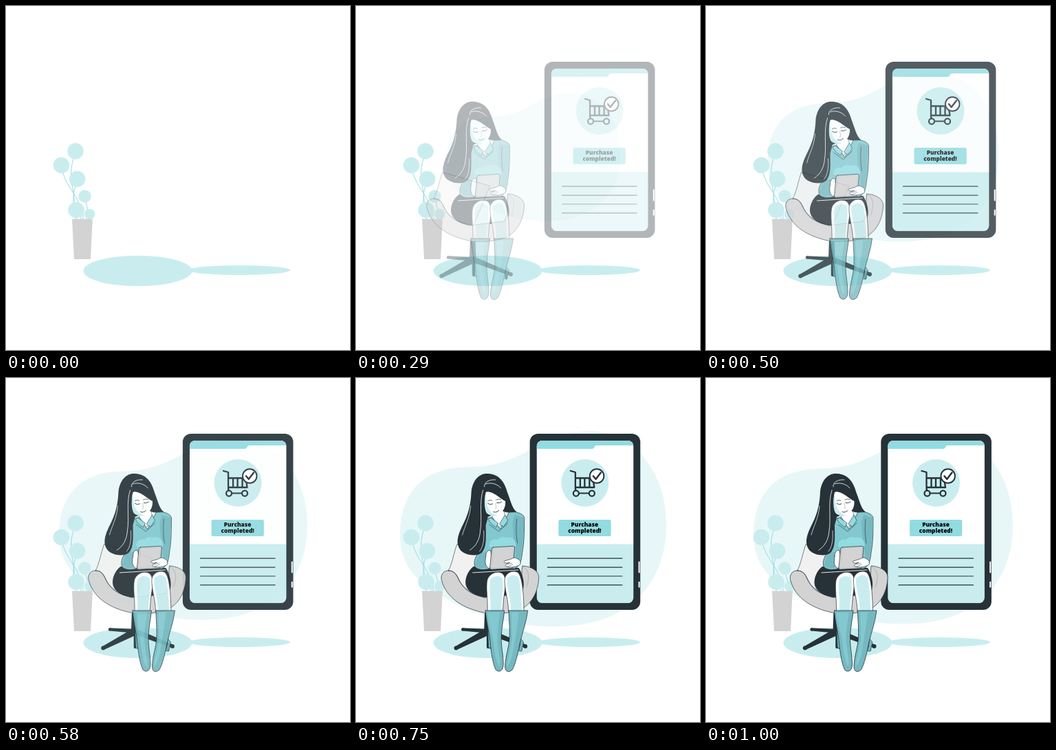
Recreate the animation shown at these times as an HTML page with a canvas. Size 500 by 500 pixels, loop 1.04 s.

```html
<!DOCTYPE html>
<html lang="en">
<head>
<meta charset="utf-8">
<title>Purchase completed</title>
<style>
html, body { margin: 0; width: 100%; height: 100%; overflow: hidden; background: #fff; }
canvas { display: block; width: 500px; height: 500px; }
</style>
</head>
<body>
<canvas id="stage" width="500" height="500"></canvas>
<script>
const SIZE = 500, LOOP = 1040, STEP = 1000 / 24;
const DARK = '#263238', PALE = '#c9edef', TEAL = '#92dbe1', MID = '#83c8cf',
      DEEP = '#75b8c0', GREY = '#d3d3d3', LIGHT = '#f1f1f1', WHITE = '#fff';

const stage = document.getElementById('stage').getContext('2d');
const layer = document.createElement('canvas');
layer.width = layer.height = SIZE;
const c = layer.getContext('2d');
c.lineCap = c.lineJoin = 'round';

function paint(path, fill, stroke, width = 0.8) {
  if (fill) { c.fillStyle = fill; c.fill(path); }
  if (stroke) { c.strokeStyle = stroke; c.lineWidth = width; c.stroke(path); }
}

const shape = (d, fill, stroke, width) => paint(new Path2D(d), fill, stroke, width);
const line = (d, stroke, width) => shape(d, null, stroke, width);

function ellipse(x, y, rx, ry, fill, stroke, width) {
  const p = new Path2D();
  p.ellipse(x, y, rx, ry, 0, 0, Math.PI * 2);
  paint(p, fill, stroke, width);
}

const circle = (x, y, r, fill, stroke, width) => ellipse(x, y, r, r, fill, stroke, width);

function box(x, y, w, h, r, fill) {
  const p = new Path2D();
  p.roundRect(x, y, w, h, r);
  paint(p, fill);
}

function floor() {
  ellipse(191.5, 385, 79, 22.2, PALE);
  ellipse(339, 384, 74, 7, PALE);
}

function plant() {
  line('M98 222C92 240 95 258 98 270Q100 285 99 305M83 243C88 262 103 275 107 290Q110 300 109 310' +
       'M101 262Q96 275 99 292M116 285L119 297M102 306V310M112 310V302', TEAL, 1);
  const blooms = [[101, 211, 11.8], [80.5, 231.5, 11.8], [103.5, 251.5, 11.8],
                  [114.5, 276.5, 9.3], [102, 296.5, 11.8], [121.5, 302.5, 7.8]];
  for (const [x, y, r] of blooms) circle(x, y, r, PALE);
  shape('M96 309.5H125.8L123 368H99Z', GREY);
}

function blob() {
  shape('M69.500 236C67 178 92 135 160 132C195 131 215 128 250 109C285 88 310 82 336 81' +
        'C400 80 446 140 446 212C446 300 390 357 290 357.5C220 358 160 337 115 306C88 288 72 268 69.500 236Z', '#e7f7f8');
}

function chair() {
  shape('M185.500 338H193L194 367H184.500Z', DARK);
  shape('M153 363.300L190 365L192 371L153 367.500Z', DARK);
  shape('M184 366L193 373L146 394.500L142 390.500Z', DARK);
  shape('M193 365L185 371L243 392L246.500 388Z', DARK);
  line('M190.500 370V391', DARK, 4.500);
  line('M238 387V395.500', DARK, 3.500);
  circle(153.5, 365.4, 2.2, DARK);
  circle(143.8, 392.4, 3, DARK);
  circle(244.5, 390, 3, DARK);
  // back, then seat shell
  shape('M145 242C140 256 138 271 132.500 280L158 314L190 320L214 262Z', LIGHT, DARK, 0.6);
  shape('M133 280C127 279 121 285 122.500 293C128 315 146 330 172 338C193 345 218 343 236 337' +
        'C254 329 263 311 264 291C265 281 254 274 240 273C238 290 242 300 235 313L185 319' +
        'C160 313 153 304 147 291C144 284 140 280 133 280Z', GREY, DARK, 0.7);
  line('M133 280C141 280 144 286 147 292C153 306 169 315 187 319', DARK, 0.6);
  line('M240 274C249 277 252 288 246 304', '#888f92', 0.5);
}

function legs() {
  shape('M169 274C160 281 156 293 158 301C162 314 178 319 194 319L237 314C245 307 243 289 235 276Z', DARK);
  shape('M189.500 340C190 320 187 306 189 294C192 283 206 279 212 285C218 291 215 306 213 321L211.500 340Z', WHITE, DARK, 0.7);
  shape('M220 340C220 322 213.500 306 214.500 292C216 283 227 278 234 283C241 291 242 318 242.500 340Z', WHITE, DARK, 0.7);
  shape('M193.500 340C195 320 191 304 193.500 293C198 286 209 287 211.500 292C213 305 210 323 209 340Z', PALE);
  shape('M223.500 340C224 320 217 305 218 291C224 285 232 285 235 291C238 306 239 324 239.500 340Z', PALE);
  line('M168 283Q200 281 234 279', WHITE, 0.9);
}

function boots() {
  shape('M190 365L191 391L193.500 394L196 382Z', DEEP, DARK, 0.6);
  shape('M238 379L242 384L239 397L235.500 397Z', DEEP, DARK, 0.6);
  shape('M186.500 338H214C213 350 210 362 209.500 375C209 392 213 405 212.500 417C212 427 205 428 201.500 424' +
        'C196 412 194.500 394 192.500 376C189.500 360 187.500 350 186.500 338Z', DEEP, DARK, 0.8);
  shape('M220.500 338H248C246 355 240 370 237 384C233.500 400 230.500 415 225.500 424C221 428 215.500 428 215 420' +
        'C215 405 221 392 221.500 376C222 360 220.500 350 220.500 338Z', DEEP, DARK, 0.8);
  shape('M189.500 340.500H208C205 358 203 370 204 385C206 402 209 412 207 420C201 412 199.500 393 196.500 375C192 360 190.500 352 189.500 340.500Z', MID);
  shape('M224 340.500H235C233 361 229 383 226 402C222 414 220 418 218 419C218 407 224 392 225 376Z', MID);
}

function sweater() {
  shape('M198 193L213 191L216 206L205 219L196 206Z', WHITE, DARK, 0.5);
  shape('M190 204C183 215 183 231 178 252C172 259 169 266 171 274C177 281 189 278 193 277L229 277' +
        'C237 274 239 264 240 254C243 239 243 221 243 203C241 196 231 195 222 193L208 220L197 203Z', MID, DARK, 0.7);
  shape('M226 210C226 230 231 244 231 260L235 269C239 263 240 247 242 227L242.500 203L229 199Z', DEEP);
  shape('M192 244C191 237 198 233 204 235C207 230 214 231 218 232C226 229 233 239 230 246L194 246Z', TEAL);
  shape('M177 254L171 272Q181 280 189 274L188 253Z', DEEP);
  shape('M194 203L205 211L202 217Q193 211 191 206Z', TEAL, DARK, 0.6);
  shape('M207 212L215 199L219 207L213 216Z', TEAL, DARK, 0.6);
  line('M192 213L206 223L219 211M232 205Q230 224 233 240', DARK, 0.6);
}

function pad() {
  shape('M187 259C187 252 191 249 194 251L197 268L192 277C185 273 186 267 187 259Z', WHITE, DARK, 0.7);
  shape('M198 246L226.500 244.300Q229.300 244.300 229 247L226.500 274Q226 276.500 224 276.800L195 278.300Q192.500 278 193 275L195.500 249Q196 246 198 246Z',
        '#c8cbcc', DARK, 0.7);
  shape('M199 248L226.500 246.500L224 274L195.500 275.500Z', GREY);
  shape('M237 266C233 261 228 260 224 263L214 266C212 269 218 270 222 268C215 271 214 273 217 274C223 276 232 275 237 271Z',
        WHITE, DARK, 0.7);
  line('M218 271L225 269M219 274L226 271', DARK, 0.5);
}

function head() {
  shape('M190 139C177 138 168 149 166 165C165 190 159 203 151 219C146 230 143 241 150 250' +
        'C157 258 174 260 181 254C189 246 187 229 187 214L190 202L211 193C218 197 225 195 232 195' +
        'C225 189 223 178 219 168C215 154 209 140 190 139Z', DARK);
  shape('M187 166C185.500 174 185 181 187 190C189 199 200 202 205 199C213 194 216 187 215.500 179' +
        'C211 177 207 173 202 170C197 167 191 164 187 166Z', WHITE);
  shape('M186.500 168C184.500 180 185 190 188 196C193 201 201 201 204 200C194 197 188 188 188 178Z', PALE);
  line('M190 182.500Q193.500 185 197 183M203 181.500Q207 182.500 210 180', DARK, 0.9);
  line('M190 178.500Q193 176.500 196 178M202 177Q206 175 209 176.500', DARK, 0.7);
  line('M201 182L202.500 189L200.500 189.500', '#849397', 0.5);
  line('M198 194.500Q202 196.500 206 192.500', DARK, 0.9);
  line('M185 158C184 151 193 147 201 148M187 154C194 151 204 154 209 160', WHITE, 0.8);
  line('M183 163C177 180 182 204 179 222C178 236 172 245 164 250', WHITE, 0.8);
  line('M184 222C185 236 183 246 178 252M165 186C164 203 156 216 153 228', WHITE, 0.7);
}

function woman() {
  legs();
  boots();
  sweater();
  pad();
  head();
}

function cart() {
  circle(334.5, 152.5, 34.5, PALE);
  line('M313.500 135L320.500 137V162M321 145.500H346L348 159H321M327.500 146V159M334 146V159M341 146V159', DARK, 2.3);
  line('M321 162V167.500H344', DARK, 2.2);
  circle(321.5, 167.7, 4, PALE, DARK, 2.3);
  circle(344.5, 167.7, 4, PALE, DARK, 2.3);
  circle(351.7, 142.5, 10.3, WHITE, DARK, 1.9);
  line('M346.500 142.500L350.200 147L357.500 137.500', DARK, 2.5);
}

function phone() {
  box(254.3, 81, 160.6, 256, 12, DARK);
  c.save();
  c.beginPath();
  c.roundRect(264.3, 91, 140.6, 236.3, 8);
  c.clip();
  c.fillStyle = WHITE;
  c.fillRect(264, 91, 142, 151);
  c.fillStyle = PALE;
  c.fillRect(264, 241.5, 142, 86);
  shape('M264 91H406V98H351Q349 98 348 100.500Q347 103 344 103H264Z', TEAL);
  c.restore();
  box(412.2, 266.5, 2, 17, 1, WHITE);
  box(412.2, 295.7, 2, 9, 1, WHITE);
  cart();
  box(296, 206, 76.3, 24, 2.5, TEAL);
  c.fillStyle = '#000';
  c.font = '800 8.4px "Open Sans", Lato, sans-serif';
  c.textAlign = 'center';
  c.fillText('Purchase', 334, 216.1);
  c.fillText('completed!', 334, 224.9);
  for (const y of [262.2, 275.1, 288, 300.9]) line(`M280 ${y}H388.5`, DARK, 1.2);
}

// cubic-bezier(.36, -.01, .5, 1.38)
function ease(x) {
  if (x >= 1) return 1;
  const curve = (u, a, b) => 3 * (1 - u) * (1 - u) * u * a + 3 * (1 - u) * u * u * b + u * u * u;
  let lo = 0, hi = 1;
  for (let i = 0; i < 24; i++) {
    const u = (lo + hi) / 2;
    if (curve(u, 0.36, 0.5) < x) lo = u; else hi = u;
  }
  return curve(lo, -0.01, 1.38);
}

function show(draw, alpha = 1, dx = 0, scale = 1) {
  c.clearRect(0, 0, SIZE, SIZE);
  c.save();
  c.translate(258 + dx, 220);
  c.scale(scale, scale);
  c.translate(-258, -220);
  draw();
  c.restore();
  stage.globalAlpha = alpha;
  stage.drawImage(layer, 0, 0);
  stage.globalAlpha = 1;
}

// 24 steps a second, each starting on a whole 10 ms
function stepAt(t) {
  let k = Math.floor((t + 5) / STEP);
  if (Math.round(k * STEP / 10) * 10 > t) k--;
  return Math.min(k, 24);
}

function render(k) {
  stage.fillStyle = WHITE;
  stage.fillRect(0, 0, SIZE, SIZE);
  const e = ease((k + 0.5) / 24);
  const alpha = Math.max(0, Math.min(1, e));
  const shift = 30 * (1 - e);
  const seen = k >= 3;
  show(floor);
  if (seen) show(blob, alpha, 0, 0.5 + 0.5 * e);
  show(plant);
  if (!seen) return;
  show(phone, alpha, shift);
  show(chair, alpha, -shift);
  show(woman, alpha, -shift);
}

let last = -1;
const start = performance.now();
function tick() {
  const k = stepAt((performance.now() - start) % LOOP);
  if (k !== last) render(last = k);
  requestAnimationFrame(tick);
}
tick();
</script>
</body>
</html>
```
